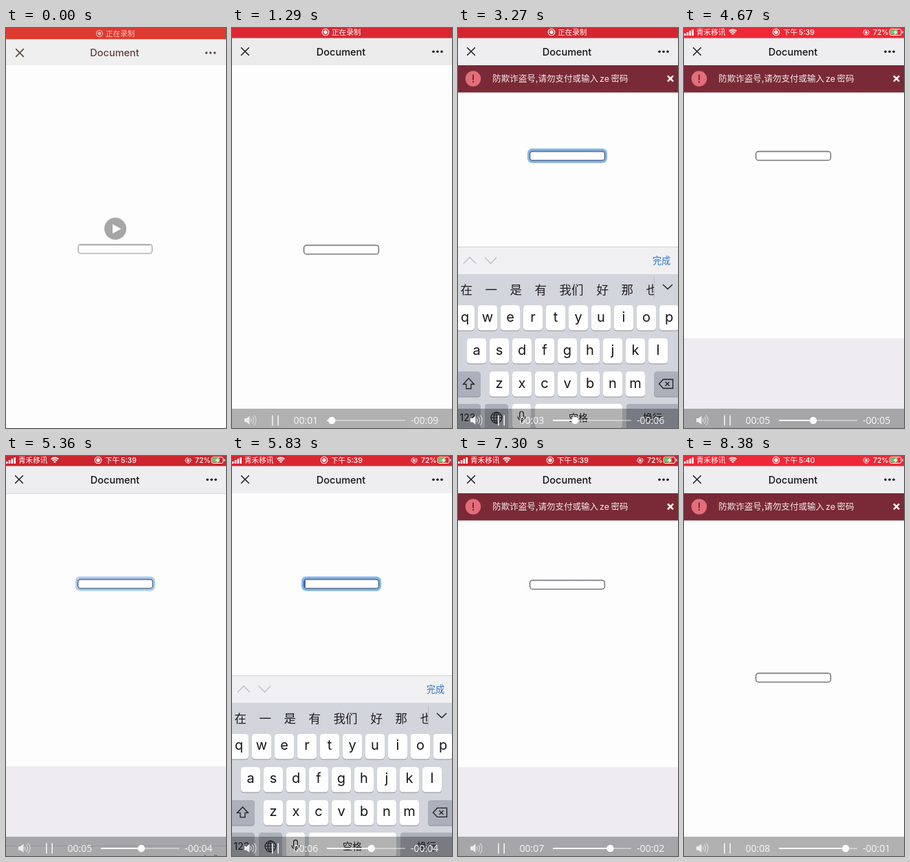
Write an HTML page with a canvas that moves like this. It is 320 px wide and 580 px high and loops after 8.46 s.

```html
<!DOCTYPE html>
<html lang="zh">
<head>
<meta charset="utf-8">
<title>Document</title>
<style>
html, body { margin: 0; width: 100%; height: 100%; overflow: hidden; background: #fdfdfd; }
canvas { display: block; width: 320px; height: 580px; }
</style>
</head>
<body>
<canvas id="stage"></canvas>
<script>
const W = 320, H = 580, LOOP = 8460, START = 670;
const CJK = '"Noto Sans CJK SC", "Noto Sans CJK", sans-serif';
const UI = 'Inter, Roboto, sans-serif';
const CLOCK = '"Open Sans", "Noto Sans", sans-serif';

const canvas = document.getElementById('stage');
const ctx = canvas.getContext('2d');
const dpr = window.devicePixelRatio || 1;
canvas.width = W * dpr;
canvas.height = H * dpr;

// ---- helpers ----
const clamp = v => Math.max(0, Math.min(1, v));
const ease = (t, a, b) => 1 - Math.pow(1 - clamp((t - a) / (b - a)), 3);
const pulse = (t, a, b, c, d) => ease(t, a, b) - ease(t, c, d);

function fill(x, y, w, h, color) {
  ctx.fillStyle = color;
  ctx.fillRect(x, y, w, h);
}

function rounded(x, y, w, h, r) {
  ctx.beginPath();
  ctx.roundRect(x, y, w, h, r);
}

function text(str, x, y, font, color, align = 'left') {
  ctx.font = font;
  ctx.fillStyle = color;
  ctx.textAlign = align;
  ctx.textBaseline = 'alphabetic';
  ctx.fillText(str, x, y);
}

function polygon(points, color) {
  ctx.beginPath();
  points.forEach(([x, y]) => ctx.lineTo(x, y));
  ctx.fillStyle = color;
  ctx.fill();
}

function line(points, color, width, close) {
  ctx.beginPath();
  points.forEach(([x, y]) => ctx.lineTo(x, y));
  if (close) ctx.closePath();
  ctx.strokeStyle = color;
  ctx.lineWidth = width;
  ctx.stroke();
}

function disc(x, y, r, color) {
  ctx.beginPath();
  ctx.arc(x, y, r, 0, 7);
  ctx.fillStyle = color;
  ctx.fill();
}

function arc(x, y, r, a, b, color, width) {
  ctx.beginPath();
  ctx.arc(x, y, r, a, b);
  ctx.strokeStyle = color;
  ctx.lineWidth = width;
  ctx.stroke();
}

function cross(x, y, r, color, width) {
  line([[x - r, y - r], [x + r, y + r]], color, width);
  line([[x + r, y - r], [x - r, y + r]], color, width);
}

// ---- page ----
function drawInput(y, focus, caret) {
  if (focus > 0) {
    ctx.globalAlpha = focus;
    rounded(101, y - 3.5, 116, 21, 7);
    ctx.fillStyle = '#82b4ea';
    ctx.fill();
    ctx.globalAlpha = 1;
  }
  rounded(104.6, y + .6, 108.8, 13, 4);
  ctx.fillStyle = '#fff';
  ctx.fill();
  const shade = ctx.createLinearGradient(0, y, 0, y + 4);
  shade.addColorStop(0, 'rgba(0,0,0,.14)');
  shade.addColorStop(1, 'rgba(0,0,0,0)');
  ctx.fillStyle = shade;
  ctx.fill();
  ctx.strokeStyle = focus > .5 ? '#4d5c70' : '#626066';
  ctx.lineWidth = 1.3;
  ctx.stroke();
  if (caret) fill(105, y + 2, 2, 10.5, '#3f6fb5');
}

function drawHeader(bg) {
  fill(0, 14, W, 40, bg);
  cross(19, 34, 5.8, '#1c1a1b', 1.5);
  text('Document', 158.5, 39.6, '500 14.5px ' + UI, '#151314', 'center');
  for (const x of [293, 299, 305]) disc(x, 34.2, 1.8, '#1c1a1b');
}

function drawBanner(p) {
  if (p <= 0) return;
  ctx.save();
  ctx.beginPath();
  ctx.rect(0, 54, W, 40);
  ctx.clip();
  ctx.translate(0, (p - 1) * 40);
  fill(0, 54, W, 39.5, '#7a2a36');
  disc(22, 73.5, 11.2, '#e36d79');
  fill(21, 67.5, 2, 8, '#7a2a36');
  fill(21, 77, 2, 2.2, '#7a2a36');
  const font = '12.5px ' + CJK, color = '#f4ebec';
  text('防欺诈盗号,', 50.3, 78, font, color);
  text('请勿支付或输入', 116.5, 78, font, color);
  text('ze', 206, 77.5, '12.5px ' + UI, color);
  text('密码', 222.5, 78, font, color);
  cross(309, 73.3, 4, '#fff', 2.4);
  ctx.restore();
}

// ---- status bar, slowly glowing while recording ----
function recordIcon(x, y) {
  arc(x, y, 4.8, 0, 7, '#fff', 1.1);
  disc(x, y, 2.7, '#fff');
}

function drawStatus(t) {
  const glow = .5 + .5 * Math.cos((t - 4500) / 1860 * 2 * Math.PI);
  fill(0, 0, W, 14.6, `rgb(${204 + 38 * glow},${36 + 4 * glow},${46 + 10 * glow})`);
  if (t < 3900) {
    recordIcon(136, 6);
    text('正在录制', 145, 10, '500 10.6px ' + CJK, '#fff');
    return;
  }
  for (let i = 0; i < 4; i++) fill(i * 3.8, 8 - i * 2, 2.6, 3 + i * 2, '#fff');
  text('青禾移讯', 18, 10, '500 10.6px ' + CJK, '#fff');
  for (const r of [2, 5, 8]) arc(71, 10.5, r, -2.3, -.84, '#fff', 1.8);
  recordIcon(134, 6);
  text('下午', 144, 10, '500 10.6px ' + CJK, '#fff');
  text(t < 7400 ? '5:39' : '5:40', 167, 10, '500 10.6px ' + UI, '#fff');
  arc(265, 6.2, 4, -1, 4.6, '#fff', 1);
  fill(263.3, 5.2, 3.4, 3, '#fff');
  arc(265, 5, 1.2, Math.PI, 0, '#fff', .8);
  text('72%', 275, 10, '500 10.4px ' + UI, '#fff');
  rounded(299, 1.7, 17, 8.8, 2.5);
  ctx.strokeStyle = '#fff';
  ctx.lineWidth = 1;
  ctx.stroke();
  fill(300.3, 3, 10.5, 6.2, '#5fd36a');
  fill(317.3, 4.5, 1.3, 3, '#fff');
  polygon([[309.5, 2], [304.5, 6.8], [307.5, 6.8], [306, 10.5], [311, 5.5], [308, 5.5]], '#fff');
}

// ---- keyboard, drawn from its own top edge ----
function key(x, y, w, dark) {
  rounded(x, y + 1, w, 36.5, 4.5);
  ctx.fillStyle = '#8d9096';
  ctx.fill();
  rounded(x, y, w, 36.5, 4.5);
  ctx.fillStyle = dark ? '#abb0ba' : '#fefefe';
  ctx.fill();
}

function keyRow(letters, x, y) {
  [...letters].forEach((c, i) => {
    key(x + i * 33 - 14, y, 28);
    text(c, x + i * 33, y + 23.5, '20px ' + UI, '#17161a', 'center');
  });
}

function drawKeyboard(top) {
  if (top >= H) return;
  const ink = '#201f23';
  ctx.save();
  ctx.translate(0, top);
  fill(0, 0, W, 40, '#f0f0f3');
  fill(0, 0, W, 1, '#d3d3d6');
  line([[8, 24.5], [17, 15.5], [26, 24.5]], '#bfbfc4', 1.4);
  line([[39, 15.5], [47.5, 24.5], [56, 15.5]], '#bfbfc4', 1.4);
  text('完成', 309.3, 25, '500 13.2px ' + CJK, '#2c74ce', 'right');

  fill(0, 40, W, 240, '#d2d5db');
  ctx.save();
  ctx.beginPath();
  ctx.rect(0, 40, 286, 45);
  ctx.clip();
  ['在', '一', '是', '有', '我们', '', '好', '那', '也'].forEach((word, i) => {
    const x = i < 5 ? 3.4 + i * 36 : 201.4 + (i - 6) * 36;
    text(word, x, 69, '17.5px ' + CJK, ink);
  });
  ctx.restore();
  fill(285, 45, 1, 29, '#b4b7bd');
  line([[298, 55], [305, 61.5], [312, 55]], ink, 1.5);

  keyRow('qwertyuiop', 10, 85);
  keyRow('asdfghjkl', 27, 133);
  key(-4, 181, 37, true);
  keyRow('zxcvbnm', 60, 181);
  key(285, 181, 40, true);
  line([[15.5, 191], [7.5, 199.5], [12, 199.5], [12, 206], [19, 206], [19, 199.5], [23.5, 199.5]], ink, 1.3, true);
  line([[292.5, 199], [298.5, 192.5], [312.5, 192.5], [312.5, 205.5], [298.5, 205.5]], ink, 1.3, true);
  cross(304.5, 199, 3, ink, 1.3);

  key(-4, 228, 37, true);
  key(39, 228, 34, true);
  key(79, 228, 27);
  key(112, 228, 127);
  key(245, 228, 80, true);
  text('123', 14, 253, '14px ' + UI, ink, 'center');
  arc(56, 248, 8, 0, 7, ink, 1.1);
  ctx.beginPath();
  ctx.ellipse(56, 248, 3.8, 8, 0, 0, 7);
  ctx.stroke();
  line([[48, 248], [64, 248]], ink, 1);
  line([[56, 240], [56, 256]], ink, 1);
  line([[49.5, 244], [62.5, 244]], ink, .9);
  line([[49.5, 252], [62.5, 252]], ink, .9);
  rounded(89.7, 239, 5.6, 10.5, 2.8);
  ctx.strokeStyle = ink;
  ctx.lineWidth = 1.2;
  ctx.stroke();
  arc(92.5, 246.5, 5.4, 0, Math.PI, ink, 1.2);
  line([[92.5, 252], [92.5, 256]], ink, 1.2);
  text('空格', 175, 253, '14px ' + CJK, ink, 'center');
  text('换行', 283, 253, '14px ' + CJK, ink, 'center');
  ctx.restore();
}

// ---- player ----
function drawControls(t) {
  const tone = '#efedee', sec = t / 1000;
  const clock = n => '00:0' + Math.max(0, Math.round(n));
  fill(0, 552, W, 28, 'rgba(0,0,0,.3)');
  polygon([[18, 566], [21, 566], [25.5, 562.5], [25.5, 575], [21, 571.5], [18, 571.5]], tone);
  for (const r of [4, 7.5, 11]) arc(24, 568.8, r, -.75, .75, '#dddbdc', 1.1);
  fill(58, 561.5, 1.7, 15, tone);
  fill(66.3, 561.5, 1.7, 15, tone);
  text(clock(sec - .05), 89.5, 574, '14px ' + CLOCK, '#f8f7f7');
  text('-' + clock(9.87 - 1.04 * sec), 260, 574, '14px ' + CLOCK, '#f8f7f7');
  const x = Math.max(138, 128.8 + .01269 * t);
  fill(138, 568, 114, 2, 'rgba(255,255,255,.4)');
  fill(138, 568, x - 138, 2, '#fff');
  disc(x, 569, 5.2, '#fff');
}

function drawPoster() {
  fill(0, 0, W, H, '#fdfdfd');
  fill(0, 0, W, 16.5, '#de3a30');
  fill(0, 16.5, W, 37.5, '#f0efef');
  ctx.filter = `blur(${.5 * dpr}px)`;
  arc(136, 8, 4.6, 0, 7, '#f1b0a8', 1.1);
  disc(136, 8, 2.5, '#f1b0a8');
  text('正在录制', 145, 12, '500 10.6px ' + CJK, '#f5c1ba');
  cross(20, 36, 5.8, '#5d4a48', 1.7);
  text('Document', 158, 41.4, '500 14.5px ' + UI, '#5f4340', 'center');
  for (const x of [291.5, 297.5, 303.5]) disc(x, 36, 1.8, '#644c49');
  rounded(105, 313.8, 107.5, 13, 3.5);
  ctx.strokeStyle = '#a3a3a3';
  ctx.lineWidth = 1.3;
  ctx.stroke();
  line([[107, 314.5], [210, 314.5]], '#a8a8a8', 1.5);
  ctx.filter = 'none';
  disc(159, 291, 16, '#a6a6a6');
  polygon([[155, 284.5], [167.5, 291.2], [155, 298]], '#fff');
}

function drawScene(t) {
  const board = pulse(t, 1800, 2200, 4000, 4350) + pulse(t, 5350, 5919, 6100, 6450);
  const focus = pulse(t, 1780, 1880, 4000, 4100) + pulse(t, 5330, 5430, 6100, 6200);
  const banner = pulse(t, 2250, 2450, 5250, 5400) + ease(t, 5900, 6100);
  const scroll = 136 * pulse(t, 1800, 2200, 7300, 7650);

  fill(0, 0, W, H, '#eeecf0');
  fill(0, 53, W, 533 - scroll, '#fdfdfd');
  drawInput(314.3 - scroll, focus, focus > .5 && t > 5400);
  drawKeyboard(H - 263 * board);
  drawHeader(t < 1800 ? '#ebebec' : '#eeedf0');
  drawBanner(banner);
  drawStatus(t);
  drawControls(t);
}

const begin = performance.now();

function frame(now) {
  const t = Math.max(0, now - begin) % LOOP;
  ctx.setTransform(dpr, 0, 0, dpr, 0, 0);
  if (t < START) drawPoster();
  else drawScene(t);
  requestAnimationFrame(frame);
}

frame(begin);
</script>
</body>
</html>
```
